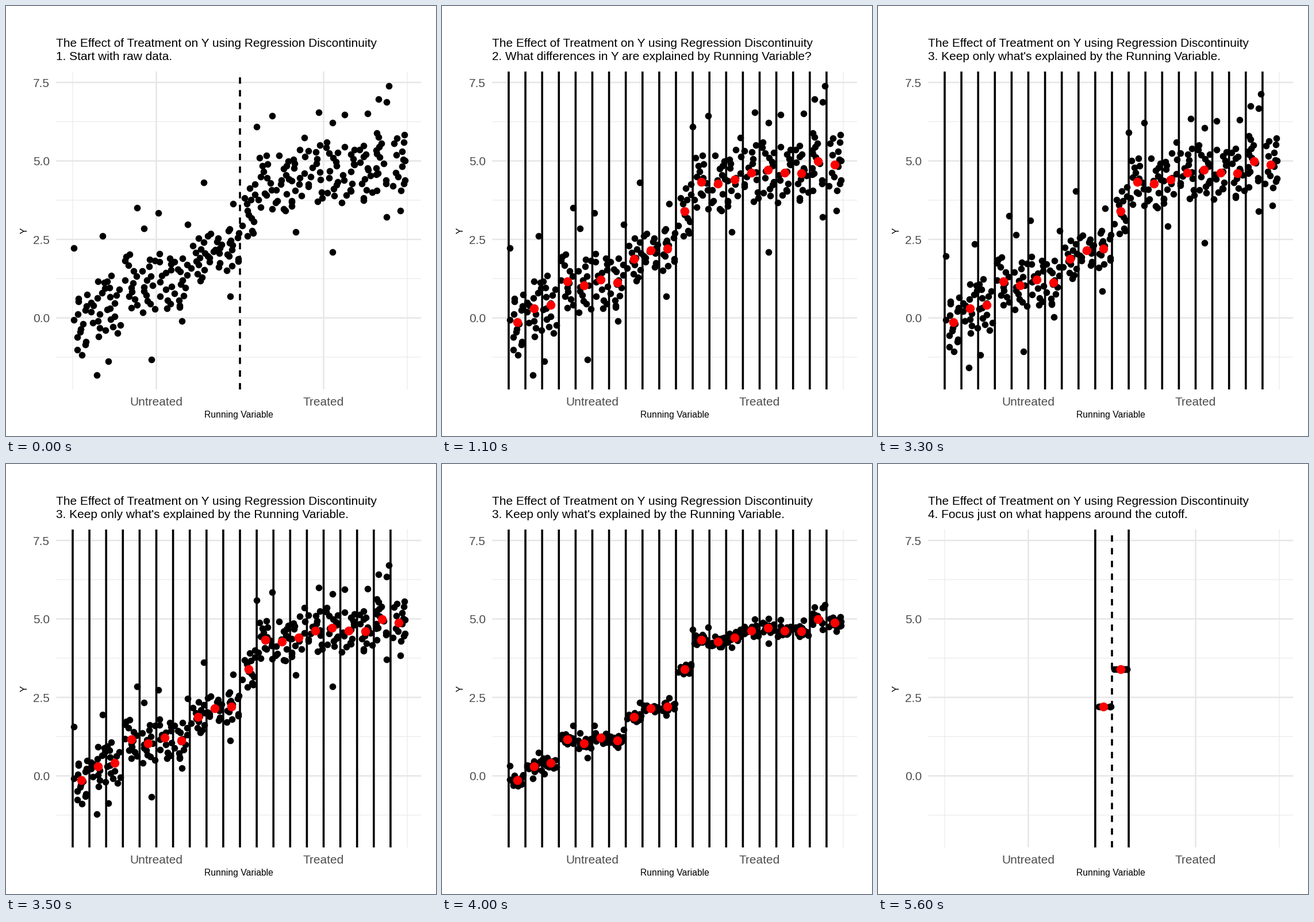
Write a matplotlib script that moves like this. It is 748x748 px and loops after 8000 ms.

```python
import numpy as np
import matplotlib.pyplot as plt
from matplotlib.animation import FuncAnimation

SIZE, DPI = 748, 100
PT = 72 / DPI                      # points per pixel
LEFT, RIGHT, TOP, BOTTOM = 87.5, 722, 114, 667
BINS, PER_BIN = 20, 14
LINE_W, DASH = 3.6, 11.08
STEP_MS, FRAMES = 100, 80

plt.rcParams["font.family"] = "Liberation Sans"
plt.rcParams["path.snap"] = False

TITLE = "The Effect of Treatment on Y using Regression Discontinuity"
STEPS = [
    "1. Start with raw data.",
    "2. What differences in Y are explained by Running Variable?",
    "3. Keep only what's explained by the Running Variable.",
    "4. Focus just on what happens around the cutoff.",
]

# Mean of Y in each bin of the running variable
MEANS = np.array([-0.13, 0.31, 0.41, 1.17, 1.03, 1.21, 1.13, 1.87, 2.15, 2.21,
                  3.40, 4.33, 4.27, 4.41, 4.62, 4.72, 4.62, 4.60, 5.00, 4.89])

# Points that stand clear of the cloud
OUTLIERS = np.array([
    (-0.993, 2.23), (-0.821, 2.61), (-0.945, -1.18), (-0.856, -1.82),
    (-0.787, -1.38), (-0.615, 3.51), (-0.574, 2.85), (-0.529, -1.33),
    (-0.488, 3.34), (-0.347, -0.10), (-0.313, 2.98), (-0.216, 4.31),
    (-0.058, 0.69), (-0.041, 3.64), (0.101, 6.09), (0.193, 6.44),
    (0.333, 2.74), (0.385, 5.74), (0.471, 6.55), (0.553, 6.22),
    (0.552, 2.10), (0.626, 6.47), (0.763, 6.51), (0.829, 6.97),
    (0.890, 7.39), (0.876, 6.88), (0.876, 3.21), (0.984, 5.83),
    (0.959, 3.42),
])


def px(x):
    return 407 + 291 * x


def py(y):
    return 542.5 - 54.6 * y


def bin_of(x):
    return ((x + 1) * BINS / 2).astype(int)


def make_points():
    """Scatter evenly around each bin mean, tighter just before the cutoff."""
    rng = np.random.default_rng(7)
    k = np.repeat(np.arange(BINS), PER_BIN)
    x = -1 + (k + rng.uniform(0.06, 0.95, k.size)) * 2 / BINS
    ranks = np.concatenate([rng.permutation(PER_BIN) for _ in range(BINS)])
    noise = 2 * (ranks + rng.uniform(0, 1, k.size)) / PER_BIN - 1
    spread = 0.95 - 0.4 * np.exp(-((k - 8) / 1.5) ** 2)
    y = MEANS[k] + spread * noise
    return np.vstack([OUTLIERS, np.column_stack([x, y])])


X, Y = make_points().T
GROUP = bin_of(X)
EDGES = -1 + np.arange(BINS) * 2 / BINS
MIDS = EDGES + 1 / BINS

fig = plt.figure(figsize=(SIZE / DPI, SIZE / DPI), dpi=DPI, facecolor="white")
ax = fig.add_axes([0, 0, 1, 1])
ax.set_xlim(0, SIZE)
ax.set_ylim(SIZE, 0)
ax.axis("off")


def line(xs, ys, width, color="black", **kw):
    return ax.plot(xs, ys, color=color, lw=width * PT,
                   solid_capstyle="butt", **kw)[0]


def grid_row(y, width, color):
    line([LEFT, RIGHT], [py(y)] * 2, width, color, zorder=1)


def column(x, width, color="black", **kw):
    return line([px(x)] * 2, [BOTTOM, TOP], width, color, **kw)


def label(x, y, text, size=20.9, color="black", **kw):
    return ax.text(x, y, text, fontsize=size * PT, color=color, **kw)


def dots(diameter, color, z):
    return ax.plot([], [], "o", ms=diameter * PT, mew=0, color=color, zorder=z)[0]


# Grid and tick labels
for y in np.arange(-1.25, 7, 2.5):
    grid_row(y, 1.3, "#ebebeb")
for x in (-1, 0, 1):
    column(x, 1.3, "#ebebeb", zorder=1)
for y in np.arange(0, 8, 2.5):
    grid_row(y, 2.5, "#e6e6e6")
    label(76, py(y) + 7.7, f"{y:.1f}", color="#4d4d4d", ha="right")
for x, name in ((-0.5, "Untreated"), (0.5, "Treated")):
    column(x, 2.5, "#e6e6e6", zorder=1)
    label(px(x), 695, name, color="#4d4d4d", ha="center")

label(87.2, 71.3, TITLE)
subtitle = label(87.2, 93.8, "")
label(404.7, 716, "Running Variable", size=15.7, ha="center")
label(37, 391, "Y", size=15.7, ha="center", va="baseline",
      rotation=90, rotation_mode="anchor")

# Data layers
cloud = dots(11.6, "black", 2)
cutoff = column(0, LINE_W, zorder=3, snap=True, dash_capstyle="butt",
                linestyle=(0, (DASH / LINE_W, DASH / LINE_W)))
walls = [column(x, LINE_W, zorder=3, snap=True) for x in EDGES]
means = dots(15.5, "red", 4)


def update(n):
    step = sum(n >= start for start in (5, 31, 56))
    subtitle.set_text(STEPS[step])
    focus = step == 3

    t = np.clip((n - 30) / 14, 0, 1)
    ease = (1 - np.cos(np.pi * t)) / 2
    y = Y + (MEANS[GROUP] - Y) * ease
    shown = (GROUP == 9) | (GROUP == 10) if focus else GROUP >= 0
    cloud.set_data(px(X[shown]), py(y[shown]))

    for k, wall in enumerate(walls):
        wall.set_visible(k in (9, 11) if focus else n >= 10)
    cutoff.set_visible(not walls[BINS // 2].get_visible())

    keep = slice(9, 11) if focus else slice(0, BINS if n >= 11 else 0)
    means.set_data(px(MIDS[keep]), py(MEANS[keep]))
    return [subtitle, cloud, cutoff, means, *walls]


anim = FuncAnimation(fig, update, frames=FRAMES, interval=STEP_MS,
                     init_func=lambda: update(0), repeat=True, repeat_delay=0)
plt.show()
```
